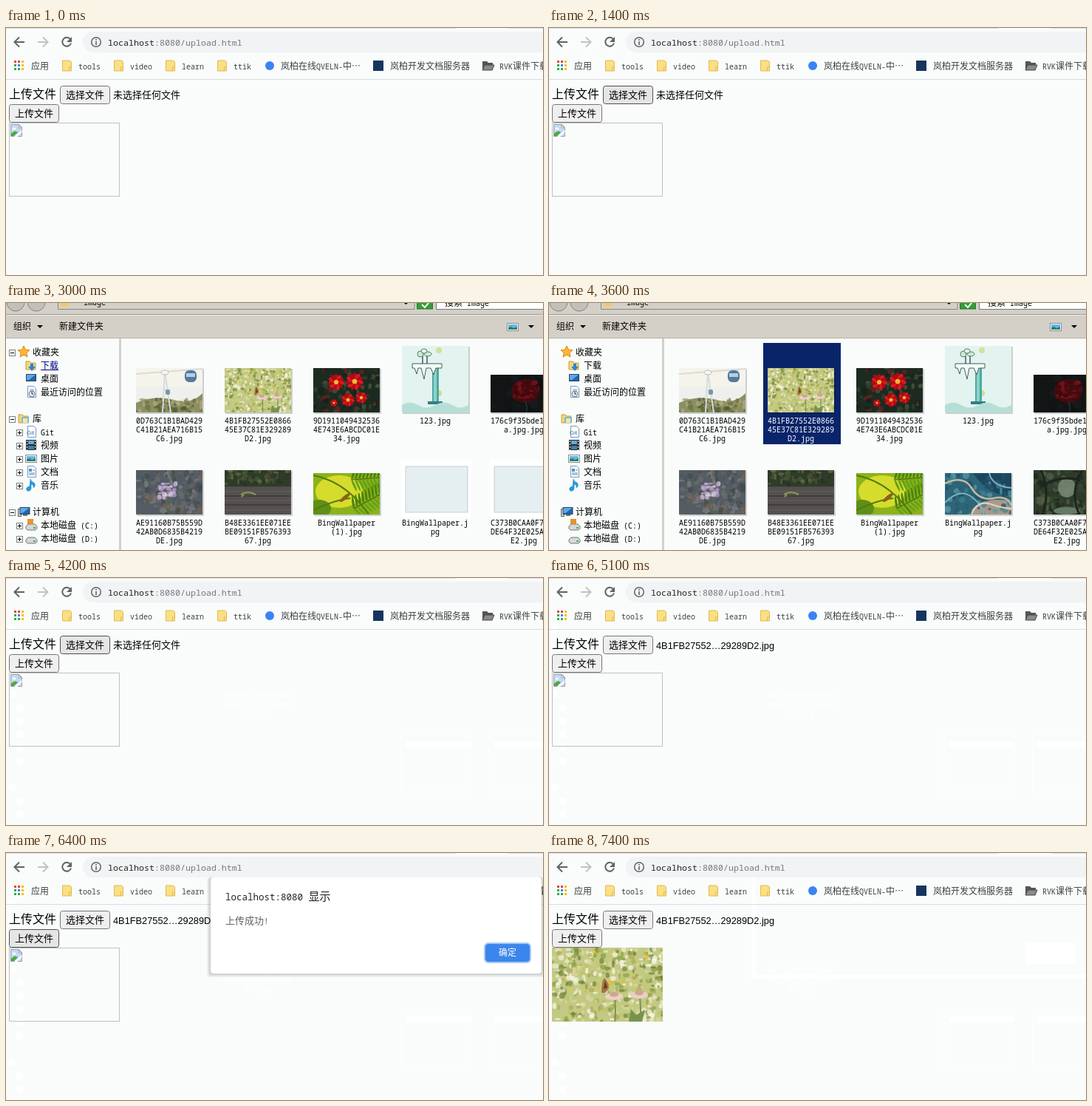
An HTML page that plays this animation: 727x334 px, repeating every 9000 ms.

```html
<!DOCTYPE html>
<html lang="zh">
<head>
<meta charset="utf-8">
<title>Upload</title>
<style>
html, body { margin: 0; width: 100%; height: 100%; overflow: hidden; background: #f9fcfb; }
svg { display: block; }
text { white-space: pre; font-family: "Noto Sans Mono", "Noto Sans CJK SC", "Noto Sans CJK", monospace; }
.cjk { font-family: "Noto Sans CJK SC", "Noto Sans CJK", sans-serif; }
.arial { font-family: "Liberation Sans", sans-serif; }
</style>
</head>
<body>
<svg id="stage" width="727" height="334" viewBox="0 0 727 334"></svg>
<script>
const LOOP = 9000, BG = '#f9fcfb', CHROME = '#d4d0c8', INK = '#000';

const rect = (x, y, w, h, fill, extra = '') =>
  `<rect x="${x}" y="${y}" width="${w}" height="${h}" fill="${fill}" ${extra}/>`;
const circle = (x, y, r, fill, extra = '') =>
  `<circle cx="${x}" cy="${y}" r="${r}" fill="${fill}" ${extra}/>`;
const ellipse = (x, y, rx, ry, fill, extra = '') =>
  `<ellipse cx="${x}" cy="${y}" rx="${rx}" ry="${ry}" fill="${fill}" ${extra}/>`;
const path = (d, fill, extra = '') => `<path d="${d}" fill="${fill}" ${extra}/>`;
const line = (d, stroke, width = 1, extra = '') =>
  path(d, 'none', `stroke="${stroke}" stroke-width="${width}" ${extra}`);
const group = (id, body, extra = '') => `<g id="${id}" ${extra}>${body}</g>`;
const at = (x, y, body) => `<g transform="translate(${x} ${y})">${body}</g>`;
const soft = body => `<g filter="url(#soft)">${body}</g>`;
const times = (n, make) => Array.from({ length: n }, (_, i) => make(i)).join('');

// Latin runs are half as wide as a CJK glyph; cy is the middle of the line.
function label(x, cy, content, size = 12, fill = INK, extra = '') {
  const runs = content.match(/[\x00-\x7f]+|[^\x00-\x7f]+/g).map(run =>
    run.charCodeAt(0) < 128
      ? `<tspan font-size="${size / 1.2}">${run}</tspan>`
      : `<tspan class="cjk" font-size="${size}">${run}</tspan>`);
  return `<text x="${x}" y="${cy + size * 0.34}" fill="${fill}" ${extra}>${runs.join('')}</text>`;
}

function randomizer(seed) {
  return () => (seed = (seed * 16807) % 2147483647) / 2147483647;
}

function blobs(seed, count, w, h, size, colors) {
  const rnd = randomizer(seed * 7919);
  return times(count, () => ellipse(
    (rnd() * w).toFixed(1), (rnd() * h).toFixed(1),
    (size * (0.3 + rnd() * 0.7)).toFixed(1), (size * (0.3 + rnd() * 0.7)).toFixed(1),
    colors[Math.floor(rnd() * colors.length)], 'opacity=".7"'));
}

const picture = (x, y, w, h, vw, vh, body) =>
  `<svg x="${x}" y="${y}" width="${w}" height="${h}" viewBox="0 0 ${vw} ${vh}" preserveAspectRatio="none">${body}</svg>`;

/* Browser page */

function browser() {
  const folder = x => path(`M${x} 44h10l2 2v12h-12z`, '#fbdf83', 'stroke="#e3b94e"') +
    path(`M${x + 9} 58v-5h3`, 'none', 'stroke="#e3b94e"');
  const dots = ['#ea4335', '#ea4335', '#fbbc05', '#34a853', '#4285f4', '#fbbc05', '#34a853', '#34a853', '#fbbc05'];
  return rect(0, 0, 727, 334, BG) + ghosts() +
    rect(0, 0, 608, 1, '#dee1e6') + rect(680, 0, 47, 1, '#dee1e6') +
    line('M25 19H12M18 12.5L11.5 19l6.5 6.5', '#5f6368', 2) +
    line('M43 19h13M50 12.5l6.5 6.5-6.5 6.5', '#c0c3c6', 2) +
    line('M87 15a6 6 0 1 0 1 5.5', '#5f6368', 2) + path('M89 12v7h-7z', '#5f6368') +
    rect(104, 5, 660, 28, '#f1f3f4', 'rx="14"') +
    circle(122, 19, 6.3, 'none', 'stroke="#5f6368" stroke-width="1.5"') +
    rect(121.2, 18, 1.6, 5, '#5f6368') + rect(121.2, 15, 1.6, 1.7, '#5f6368') +
    label(138, 19, 'localhost<tspan fill="#757a7f">:8080/upload.html</tspan>', 14, '#222') +
    dots.map((c, i) => rect(11 + i % 3 * 5, 44 + Math.floor(i / 3) * 5, 3, 3, c)).join('') +
    label(34, 51.5, '应用', 12, '#3c4043') +
    ['tools', 'video', 'learn', 'ttik'].map((name, i) =>
      folder(76.5 + i * 70) + label(98 + i * 70, 51.5, name, 12, '#3c4043')).join('') +
    circle(357, 51, 6, '#3b82f6') + label(372, 51.5, '岚柏在线QVELN-中⋯', 12, '#3c4043') +
    rect(497, 44, 14, 14, '#17345f') + label(520, 51.5, '岚柏开发文档服务器', 12, '#3c4043') +
    path('M645 45h6l2 2h6v10h-14z', '#555') + path('M645 57l3-7h13l-3 7z', '#8a8a8a', 'stroke="#444"') +
    label(668, 51.5, 'RVK课件下载', 12, '#3c4043') +
    rect(0, 69, 727, 1, '#dadce0') +
    label(4, 90, '上传文件', 16) +
    button('choose', 73, 78, '选择文件') + button('upload', 4, 103, '上传文件') +
    group('noFile', label(145, 91, '未选择任何文件', 13)) +
    group('fileName', `<text class="arial" x="145" y="96" font-size="12.8">4B1FB27552…29289D2.jpg</text>`) +
    group('broken', rect(4.5, 128.5, 149, 99, 'none', 'stroke="#c0c0c0"') + brokenIcon()) +
    group('preview', picture(4, 128, 150, 100, 150, 100, meadow()));
}

function button(id, x, y, caption) {
  return rect(x + 0.5, y + 0.5, 67, 24, '#efefef', `id="${id}" rx="3" stroke="#767676"`) +
    label(x + 8, y + 13, caption, 13);
}

function brokenIcon() {
  return at(6, 130,
    path('M.5 .5h11l4 4v12h-15z', '#c5d9f7', 'stroke="#9aa0a6"') +
    path('M11 1v4h4z', '#fff', 'stroke="#9aa0a6"') +
    ellipse(5, 6, 2.5, 1.5, '#fff') + path('M1 16v-3q5-6 9-2l-5 5z', '#4fa83d') +
    path('M5 17L15.5 8v3L9 17z', '#fff'));
}

// Faint white traces left on the page by closed windows.
function ghosts() {
  const file = files[1].slice(3).map((name, row) =>
    label(341, 158.5 + row * 12, name, 12, '#fff', 'text-anchor="middle"')).join('') +
    [535, 655].map(x => rect(x, 213, 95, 77, 'none', 'stroke="#fff"') + rect(x + 6, 221, 88, 8, '#fff')).join('') +
    tree.filter(hasExpander).map(([y, depth]) => rect(4 + depth * 10, y - 3, 9, 9, '#fff')).join('');
  const alert = line('M277 33V167H727', '#fff', 5) + rect(646, 121, 66, 29, '#fff') +
    label(297, 59, 'localhost:8080 显示', 15, '#fff');
  return group('fileGhost', file) + group('alertGhost', alert);
}

/* Photos */

function meadow() {
  const daisy = (x, y) => line(`M${x} ${y}q4 18 0 45`, '#7d9150', 2) +
    ellipse(x, y + 2, 12, 5, '#ecd0c6') + ellipse(x, y - 1, 6, 3.5, '#cfa68c');
  return rect(0, 0, 150, 100, '#c3c983') +
    soft(blobs(77, 420, 150, 100, 4.5, ['#8a9f45', '#eef0d8', '#b9c66d', '#6d8236', '#fbfaec', '#d9d79c', '#a9a955']) +
      blobs(12, 16, 130, 60, 3.5, ['#f0c728', '#e8b92a'])) +
    daisy(84, 64) + daisy(118, 62) +
    path('M67 61q0-14 4-20 5 4 6 14l-5 6z', '#a9713f') +
    path('M70 56l2-11 3 9z', '#54402f') +
    path('M104 100l3-17 7 8 12-7-4 16z', '#78944c');
}

function cableCar() {
  return rect(0, 0, 90, 60, '#eef0ec') + rect(0, 0, 90, 25, '#f6f3ea') +
    soft(path('M0 47Q25 36 50 43T90 34V60H0z', '#8a8f63') +
      at(0, 42, blobs(5, 70, 90, 18, 4, ['#66713f', '#94935f', '#b5aa7c', '#4f5c37']))) +
    line('M36 60L39 5 47 60M0 8L90 1M37 30h7', '#d7dcdc', 2) +
    ellipse(39, 6, 5, 3, '#f6f7f7', 'stroke="#b4bbc0"') +
    rect(66, 3, 16, 16, '#4f7ba0', 'rx="6"') + rect(68, 7, 12, 5, '#b7cfdd') +
    rect(40, 29, 6, 7, '#7597aa', 'rx="2"');
}

function redFlowers() {
  const flower = (x, y, r) => times(11, i =>
    ellipse(x, y - r * 0.55, r * 0.25, r * 0.45, i % 2 ? '#dc1820' : '#b00a12', `transform="rotate(${i * 33} ${x} ${y})"`)) +
    circle(x, y, r * 0.28, '#f2b632');
  return rect(0, 0, 90, 60, '#1d2a20') +
    soft(blobs(9, 90, 90, 60, 4, ['#31452f', '#152018', '#475a3e', '#6a2423'])) +
    flower(31, 19, 11) + flower(56, 18, 12) + flower(47, 43, 9) + flower(65, 40, 8) + flower(28, 47, 5);
}

function island() {
  return rect(0, 0, 90, 90, '#e3f3ef') + circle(50, 6, 4, '#cfe39a') + circle(50, 64, 4, '#c9df91') +
    rect(41, 24, 9, 52, '#4ba9a5') + rect(43, 24, 4, 52, '#8ed2c9') +
    path('M14 24h40v6h-8l-3 9-4-9h-6l-3 15-4-15h-4l-2 8-3-8h-3z', '#f3faf6', 'stroke="#48605b"') +
    line('M28 24V12M34 24V13', '#48605b', 1.5) +
    ellipse(25, 11, 4, 4, '#cfe8d4', 'stroke="#597c74"') + ellipse(35, 11, 5, 3, '#cfe8d4', 'stroke="#597c74"') +
    ellipse(30, 7, 4, 3, '#e8f5e6', 'stroke="#597c74"') +
    path('M35 75h20v4H35z', '#337f80') +
    path('M0 80q11-7 22 0t23 0 23 0 22 0v10H0z', '#b5dfd6');
}

function rose() {
  return rect(0, 0, 90, 51, '#121516') +
    soft(blobs(8, 25, 90, 51, 7, ['#171e1e', '#0d1010']) + ellipse(47, 22, 19, 16, '#430b10') +
      at(32, 9, blobs(14, 40, 32, 27, 4, ['#6d0f17', '#3a080d', '#84131c'])) +
      line('M47 36q4 8 1 16', '#1d302a', 2));
}

function lilac() {
  return rect(0, 0, 90, 60, '#555c62') +
    soft(blobs(25, 160, 90, 60, 5, ['#424c4b', '#6c6c6c', '#706352', '#4c5966', '#7c8088']) +
      line('M43 37q4 12 1 23', '#58653f', 1.5) +
      at(30, 18, blobs(31, 45, 24, 20, 3.5, ['#c9b5d9', '#a98fc0', '#ddd0e5'])));
}

function plank() {
  return rect(0, 0, 90, 60, '#4a4a4b') +
    soft(rect(0, 0, 90, 22, '#2f3b2b') + blobs(4, 60, 90, 20, 4, ['#465d32', '#25351f', '#65733d', '#594c37'])) +
    rect(0, 23, 90, 37, '#54504f') + line('M0 35h90M0 47h90', '#3b3939', 1.5) +
    line('M0 29h90M0 41h90M0 54h90', '#625e5c') +
    line('M22 33q9-6 20 0M26 33l-3 3', '#8b9a4a', 2);
}

function fern() {
  const frond = (x, y, angle) => `<g transform="translate(${x} ${y}) rotate(${angle})">` +
    line('M0 0H70', '#31530d') + times(14, i =>
      ellipse(i * 5, -8, 1.5, 9, '#4a830e', `transform="rotate(20 ${i * 5} 0)"`) +
      ellipse(i * 5, 8, 1.5, 9, '#66a217', `transform="rotate(-20 ${i * 5} 0)"`)) + '</g>';
  return rect(0, 0, 90, 56, '#8db21c') + soft(ellipse(35, 25, 32, 22, '#d6dc2c') + ellipse(8, 48, 16, 12, '#5f8f16')) +
    frond(55, 48, -28) + frond(52, 9, -4) + line('M0 3Q45 12 75 56M0 50Q30 36 50 34', '#547b12', 2) +
    ellipse(43, 33, 9, 2.5, '#8b611d', 'transform="rotate(-40 43 33)"');
}

function sea() {
  return rect(0, 0, 90, 56, '#2d6579') +
    soft(path('M38 0h52v30Q60 32 38 0z', '#1c4660') + path('M90 56H32Q46 30 90 38z', '#a8998a') +
      blobs(42, 80, 90, 56, 5, ['#3b8196', '#1e4c63', '#5c9aa5', '#2a5b70']) +
      line('M0 14Q25 2 36 20T66 34 90 44', '#c6b79e', 2.5) +
      line('M0 40q20-20 36-8t16 24M60 0q4 18 30 20', '#7fb0b5', 2) +
      line('M36 56q8-20 26-14t28 6', '#ddd2bf', 2));
}

function forest() {
  return rect(0, 0, 90, 60, '#2d3a2a') +
    soft(blobs(18, 130, 90, 60, 5, ['#415338', '#1c281e', '#566346', '#354530']) +
      ellipse(45, 24, 12, 13, '#8a9a82', 'opacity=".7"') + ellipse(45, 55, 18, 5, '#647a67')) +
    line('M12 60Q23 30 10 0M62 60Q48 30 66 0M12 22Q36 5 63 14', '#1d241c', 3);
}

/* File dialog */

function expander(x, y, open) {
  return rect(x + 0.5, y - 3.5, 8, 8, '#fff', 'stroke="#808080"') +
    line(`M${x + 2} ${y + 0.5}h5${open ? '' : 'm-2.5-2.5v5'}`, INK);
}

const drive = path('M1 10l3-3h9l3 3v3l-2 2H3l-2-2z', '#d4d8da', 'stroke="#777"') + rect(11, 11, 3, 2, '#36bd43');
const monitor = rect(1.5, 2.5, 13, 9, '#2364b0', 'stroke="#294864"') + path('M2 3h12L5 10H2z', '#62a8e2');
const sheet = path('M3.5 .5h8l3 3v12h-11z', '#fff', 'stroke="#7897b8"');
const folderIcon = path('M1 3h5l2 2h6v9H1z', '#f7d574', 'stroke="#c89b37"');
const arrowBlue = path('M7 6h4v4h3l-5 6-5-6h3z', '#2a82d7');
const landscape = rect(0.5, 3.5, 15, 10, '#fff', 'stroke="#7b8b97"') + rect(2, 5, 12, 7, '#64b5e6') +
  path('M2 12V9l4-1 3 2 5-2v4z', '#327e65');

const tree = [
  [66, 0, '收藏夹', path('M8 0l2.3 5 5.7 .7-4.2 3.8 1.2 5.5-5-2.8-5 2.8 1.2-5.5L0 5.7 5.7 5z', '#ffb72b', 'stroke="#d8851b"')],
  [84, 1, '下载', folderIcon + arrowBlue],
  [102, 1, '桌面', monitor],
  [120, 1, '最近访问的位置', sheet + line('M6 5h6M6 7h6', '#7695b9') + circle(9, 11, 4, '#d9e8f2', 'stroke="#697f91"') + line('M9 8v3h2', '#333')],
  [156, 0, '库', folderIcon + rect(5, 6, 10, 8, '#75bce0', 'rx="1"') + rect(7, 8, 6, 6, '#f7e6a8')],
  [174, 1, 'Git', sheet + '<text class="arial" x="2" y="12" font-size="8" fill="#316eaa">Git</text>'],
  [192, 1, '视频', rect(1, 1, 14, 14, '#252c32') + rect(4, 2, 8, 5, '#67a9d4') + rect(4, 9, 8, 5, '#477da5') +
    line('M2.5 2v13M13.5 2v13', '#fff', 1, 'stroke-dasharray="2 2"')],
  [210, 1, '图片', landscape],
  [228, 1, '文档', sheet + rect(5, 4, 4, 4, '#4b94ce') + line('M10 6h3M5 10h8M5 12h8', '#5686b2')],
  [246, 1, '音乐', path('M7 0q1 4 5 5 3 4-1 7 1-4-3-5v6q-1 4-5 3-3-2 0-5l3-1z', '#229be3', 'stroke="#1770b0" stroke-width=".5"')],
  [282, 0, '计算机', rect(0.5, 4.5, 4, 10, '#c8ced2', 'stroke="#666"') + at(1.5, 0, monitor) + rect(7, 12, 6, 2, '#777')],
  [300, 1, '本地磁盘 (C:)', drive + rect(3, 0, 8, 7, '#e69332')],
  [318, 1, '本地磁盘 (D:)', drive]
];
const hasExpander = ([y, depth]) => depth === 0 || y > 150;

const files = [
  [88, 60, cableCar, '0D763C1B1BAD429', 'C41B21AEA716B15', 'C6.jpg'],
  [88, 60, () => picture(0, 0, 90, 60, 150, 100, meadow()), '4B1FB27552E0866', '45E37C81E329289', 'D2.jpg'],
  [88, 60, redFlowers, '9D1911049432536', '4E743E6ABCDC01E', '34.jpg'],
  [58, 90, island, '123.jpg'],
  [97, 51, rose, '176c9f35bde1a4f', 'a.jpg.jpg'],
  [226, 60, lilac, 'AE91160B75B559D', '42AB0D6835B4219', 'DE.jpg'],
  [226, 60, plank, 'B48E3361EE071EE', 'BE09151FB576393', '67.jpg'],
  [230, 56, fern, 'BingWallpaper', '(1).jpg'],
  [230, 56, sea, 'BingWallpaper.j', 'pg'],
  [226, 60, forest, 'C373B0CAA0F77B1', 'DE64F32E025AA11', 'E2.jpg']
];

function fileItem([y, h, art, ...names], i) {
  const x = 176 + i % 5 * 120, textY = i < 5 ? 158.5 : 296.5;
  return group('thumb' + i, rect(x + 1, y + 1, 91, h + 1, '#000', 'opacity=".18"') + picture(x, y, 90, h, 90, h, art())) +
    group('name' + i, names.map((name, row) =>
      label(x + 45, textY + row * 12, name, 12, 'currentColor', 'text-anchor="middle"')).join(''));
}

function explorer() {
  const placeholder = x => rect(x, 213, 95, 77, '#fff') + rect(x + 6, 221, 84, 62, '#e5eef1', 'stroke="#c8d0d3"');
  return rect(0, 0, 727, 334, BG) + rect(0, 0, 727, 48, CHROME) +
    circle(13, -1, 12, '#c2c0bb', 'stroke="#85837e"') + circle(41, -1, 12, '#c2c0bb', 'stroke="#85837e"') +
    rect(70, -1, 479, 10, CHROME) + line('M70.5 0v8.5H553V0', '#8a8780') + rect(74, 0, 11, 5, '#edcb6b') +
    label(105, -1, 'image') + path('M539 0h5l-2.5 2z', INK) +
    rect(556.5, -8, 21, 16, '#379b3b', 'stroke="#267729"') + line('M563 2l4 4 5-6', '#e7ffe4', 2) +
    rect(583, 0, 144, 8, '#fff') + line('M582.5 0v8.5H727', '#777') + label(594, 0, '搜索 Image') +
    rect(0, 15, 727, 1, '#9d9992') + rect(0, 16, 727, 1, '#f0eee9') + rect(0, 47, 727, 1, '#b7b3ab') +
    label(10, 32, '组织') + path('M42 30h8l-4 4z', INK) + label(72, 32, '新建文件夹') +
    at(678, 24, landscape) + path('M707 30h8l-4 4z', INK) +
    rect(153, 48, 3, 286, CHROME) +
    tree.map(([y, depth, name, icon]) =>
      at(16 + depth * 10, y - 8, icon) + label(36 + depth * 11, y + 0.5, name, 12, INK, name === '下载' ? 'id="download"' : '')).join('') +
    group('expanders', tree.filter(hasExpander).map(([y, depth]) => expander(4 + depth * 10, y + 1, !depth)).join('') +
      rect(47, 90, 24, 1, '#000080')) +
    group('emptyGhost', rect(73, 78, 68, 25, '#fff') + label(145, 91, '未选择任何文件', 13, '#fff') + rect(153, 48, 3, 286, CHROME)) +
    group('files', rect(290, 54, 105, 137, '#0a246a', 'id="selection"') +
      group('placeholder8', placeholder(535)) + group('placeholder9', placeholder(655)) +
      files.map(fileItem).join(''));
}

/* Alert */

function alertBox() {
  return times(6, i => rect(277 - i, 33, 448 + 2 * i, 130 + i, '#000', 'opacity=".04" rx="4"')) +
    rect(277, 33, 448, 130, '#fff', 'rx="4"') +
    label(297, 59, 'localhost:8080 显示', 15, '#202124') + label(297, 92, '上传成功!', 13, '#5f6368') +
    rect(648, 122, 62, 26, 'none', 'id="okRing" rx="5" stroke="#a8c7f5" stroke-width="2"') +
    rect(649, 123, 60, 24, '#1a73e8', 'id="ok" rx="4"') + label(667, 135, '确定', 12, '#fff');
}

document.getElementById('stage').innerHTML =
  '<defs><filter id="soft"><feGaussianBlur stdDeviation=".7"/></filter></defs>' +
  browser() + group('alert', alertBox()) + group('explorer', explorer());

const el = id => document.getElementById(id);
const show = (id, visible) => el(id).setAttribute('display', visible ? 'inline' : 'none');
const skins = { normal: ['#efefef', '#767676'], hover: ['#e5e5e5', '#4f4f4f'], active: ['#f5f5f5', '#8d8d8d'] };

function skin(id, state) {
  const [fill, stroke] = skins[state];
  el(id).setAttribute('fill', fill);
  el(id).setAttribute('stroke', stroke);
}

function draw(t) {
  const within = (from, to) => t >= from && t < to;
  skin('choose', within(1000, 1400) ? 'active' : within(100, 5100) ? 'hover' : 'normal');
  skin('upload', within(6000, 6200) ? 'active' : within(5300, 7400) ? 'hover' : 'normal');
  show('noFile', t < 5100);
  show('fileName', t >= 5100);
  show('broken', t < 7400);
  show('preview', t >= 7400);
  show('fileGhost', t >= 4200);
  show('alertGhost', t >= 7400);

  show('explorer', within(2500, 4200));
  show('emptyGhost', t < 3000);
  show('files', t >= 3000);
  show('expanders', t < 3300);
  el('download').setAttribute('fill', t < 3300 ? '#000080' : INK);
  [[8, 3200], [9, 3300]].forEach(([i, ready]) => {
    show('thumb' + i, t >= ready);
    show('placeholder' + i, t < ready);
  });
  show('selection', t >= 3600);
  el('name1').setAttribute('color', t >= 3600 ? '#fff' : INK);

  show('alert', within(6200, 7400));
  show('okRing', t < 7200);
  el('ok').setAttribute('fill', t < 6400 ? '#1a73e8' : t < 7200 ? '#3b86ec' : '#5f9cef');
}

const start = performance.now();
function tick() {
  draw((performance.now() - start) % LOOP);
  requestAnimationFrame(tick);
}
tick();
</script>
</body>
</html>
```
